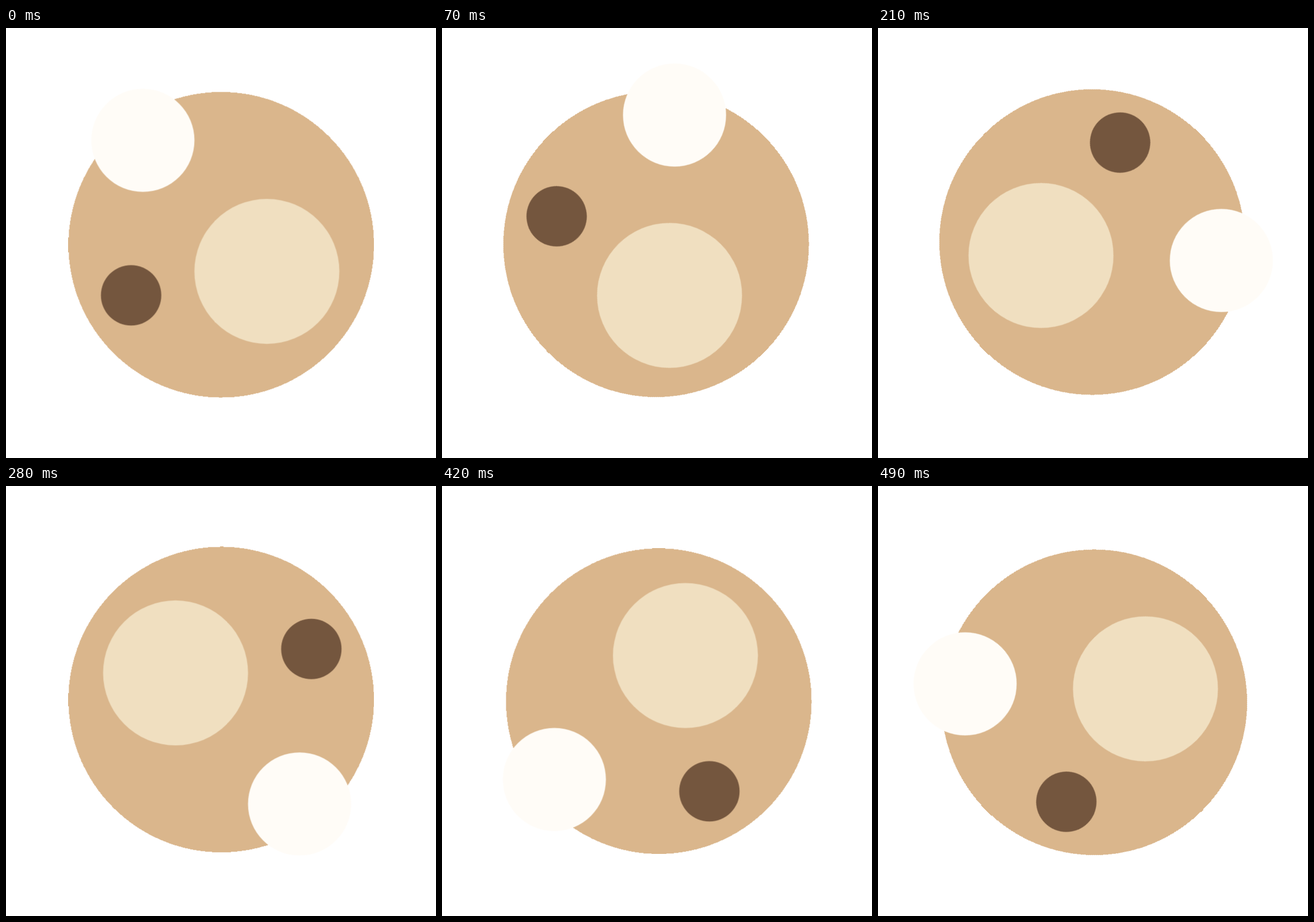
An HTML page that plays this animation: 748x748 px, repeating every 560 ms.

```html
<!DOCTYPE html>
<html lang="en">
<head>
<meta charset="utf-8">
<title>Spinning discs</title>
<style>
  html, body { margin: 0; width: 100%; height: 100%; overflow: hidden; background: #fff; }
  svg { display: block; width: 100vw; height: 100vh; }
  /* an eighth of a turn every 70 ms */
  .spin { animation: spin 560ms steps(8, end) infinite; transform-origin: 0 0; }
  @keyframes spin { to { transform: rotate(360deg); } }
</style>
</head>
<body>
<svg viewBox="0 0 748 748">
  <g transform="translate(374.4 374.3)">
    <g class="spin">
      <circle cy="2.75" r="265.8" fill="#dab68c" shape-rendering="crispEdges"/>
      <circle cx="79.4" cy="49.1" r="126.1" fill="#f0dfc0"/>
      <circle cx="-136.3" cy="-178.9" r="89.7" fill="#fffcf7"/>
      <circle cx="-156.8" cy="90.7" r="52.5" fill="#74563e"/>
    </g>
  </g>
</svg>
</body>
</html>
```
